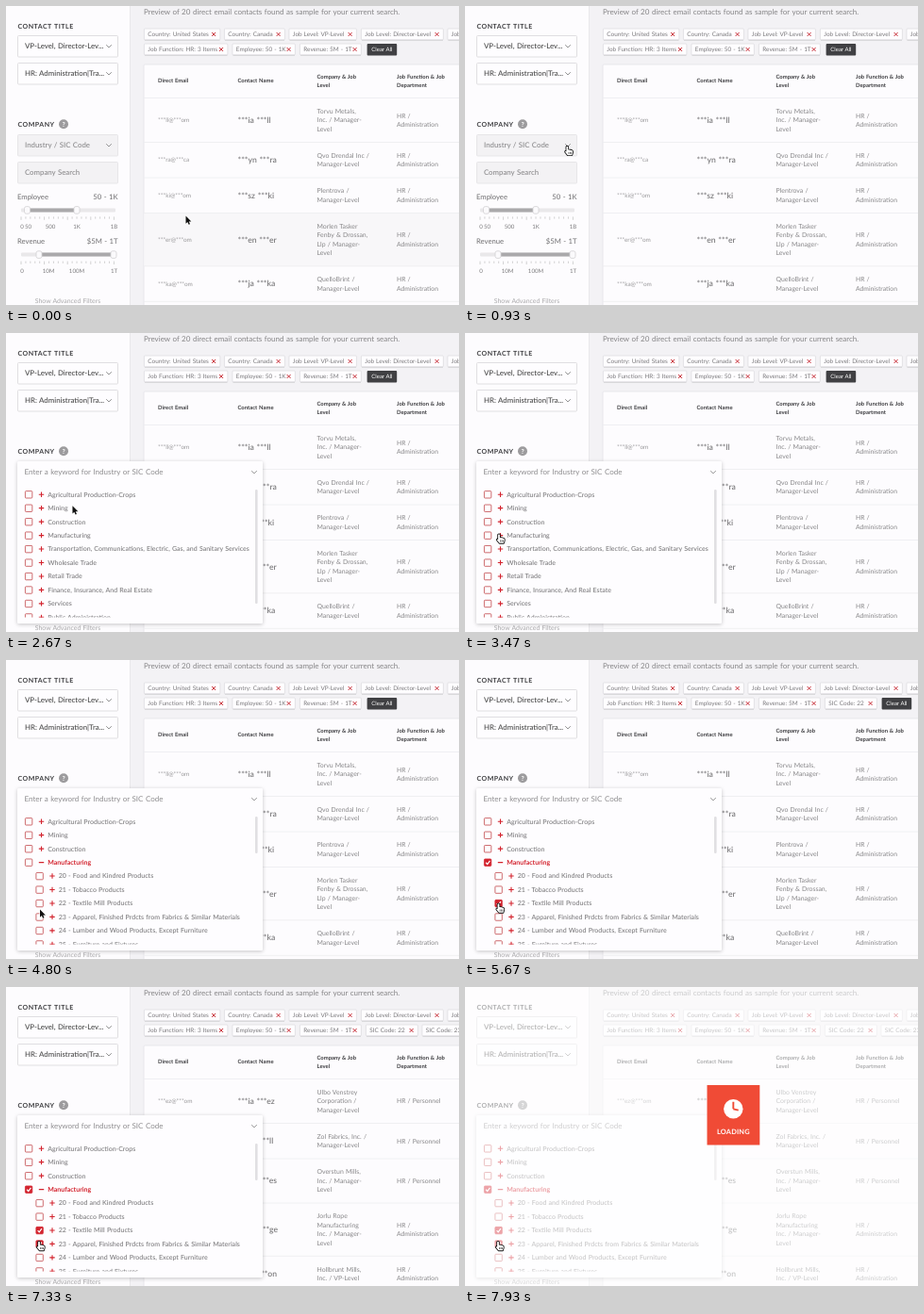
These frames come from a looping animation (480 by 317 pixels, 8000 ms). An HTML page with a canvas:

```html
<!DOCTYPE html>
<html lang="en">
<head>
<meta charset="utf-8">
<title>Contact search filters</title>
<style>
html, body { margin: 0; width: 100%; height: 100%; overflow: hidden; background: #fff; }
canvas { display: block; width: 480px; height: 317px; }
</style>
</head>
<body>
<canvas id="stage"></canvas>
<script>
const W = 480, H = 317, LOOP = 8000;
const canvas = document.getElementById('stage');
const ctx = canvas.getContext('2d');
const ratio = Math.max(1, window.devicePixelRatio || 1);
canvas.width = W * ratio;
canvas.height = H * ratio;

const RED = '#d3242f', DARK = '#3c3c3f', GREY = '#878688';

// Moments of the story, in ms
const OPEN = 2070, EXPAND = 3800, CHECK_A = 5430, CHIP_A = 5530,
      SWAP = 6250, CHECK_B = 7200, CHIP_B = 7300;
const LOADS = [[5760, 6760], [7420, 9000]];
const FADE = 180;

const clamp = v => Math.max(0, Math.min(1, v));
const ease = v => v * v * (3 - 2 * v);

function text(s, x, cy, size, color = GREY, weight = 400, align = 'left', spacing = 0) {
  ctx.font = `${weight} ${size}px Lato, "Open Sans", sans-serif`;
  ctx.textRendering = 'geometricPrecision';
  ctx.letterSpacing = spacing + 'px';
  ctx.wordSpacing = size * 0.06 + 'px';
  ctx.textAlign = align;
  ctx.fillStyle = color;
  ctx.fillText(s, x, cy + size * 0.34);
}

function box(x, y, w, h, fill, stroke, r = 1) {
  ctx.beginPath();
  ctx.roundRect(x, y, w, h, r);
  if (fill) { ctx.fillStyle = fill; ctx.fill(); }
  if (stroke) { ctx.strokeStyle = stroke; ctx.lineWidth = 0.8; ctx.stroke(); }
}

function line(points, color, width) {
  ctx.beginPath();
  points.forEach(([x, y]) => ctx.lineTo(x, y));
  ctx.strokeStyle = color;
  ctx.lineWidth = width;
  ctx.stroke();
}

const chevron = (x, y) => line([[x - 2.8, y - 1.4], [x, y + 1.4], [x + 2.8, y - 1.4]], '#8a898b', 0.9);

function lines(list, x, cy, size, color, weight) {
  list.forEach((s, i) => text(s, x, cy + (i - (list.length - 1) / 2) * 9.4, size, color, weight));
}

/* ---------- sidebar ---------- */

function slider(y, from, to, marks) {
  box(16, y - 2, 100, 4, '#e9e8ea');
  box(from, y - 2, to - from, 4, '#aaa9ab', null, 0);
  for (const x of [from, to]) box(x - 3, y - 3.8, 6, 7.6, '#fbfafc', '#d2d1d4', 2);
  for (let i = 0; i <= 20; i++) {
    const x = 16 + i * 4.92;
    line([[x, y + 7], [x, y + (i % 5 ? 9.2 : 10.4)]], '#b4b4b4', 0.6);
  }
  for (const [s, x] of marks) text(s, x, y + 17.5, 6.1, '#7c7b7d', 400, 'center');
}

function field(y, label, muted, arrow) {
  box(12.5, y + 0.5, 106, 22.5, muted ? '#f3f2f4' : '#fefdff', muted ? '#e2e1e4' : '#d8d7da');
  text(label, 20, y + 11.6, 7.8, muted ? '#929193' : '#555', 600);
  if (arrow) chevron(109, y + 11.6);
}

function sidebar() {
  box(0, 0, 131, H, '#fdfcfe', null, 0);
  line([[131.5, 0], [131.5, H]], '#e9e8eb', 1);
  text('CONTACT TITLE', 12.5, 22, 7, DARK, 700, 'left', 0.5);
  field(31, 'VP-Level, Director-Lev...', false, true);
  field(60, 'HR: Administration|Tra...', false, true);
  text('COMPANY', 12.5, 125.5, 7, DARK, 700, 'left', 0.5);
  ctx.beginPath();
  ctx.arc(61, 125.2, 5, 0, 7);
  ctx.fillStyle = '#9c9b9d';
  ctx.fill();
  text('?', 61, 125.4, 7, '#fff', 700, 'center');
  field(136, 'Industry / SIC Code', true, true);
  field(165, 'Company Search', true, false);
  text('Employee', 12, 202, 7.7, '#6f6e70');
  text('50 - 1K', 118.5, 202, 7.7, '#6f6e70', 400, 'right');
  slider(216.4, 22.5, 75, [['0', 17], ['50', 23.5], ['500', 47], ['1K', 75], ['1B', 114.5]]);
  text('Revenue', 12, 249, 7.7, '#6f6e70');
  text('$5M - 1T', 118.5, 249, 7.7, '#6f6e70', 400, 'right');
  slider(263.6, 35, 114, [['0', 17], ['10M', 45], ['100M', 75], ['1T', 114.5]]);
  text('Show Advanced Filters', 65.5, 312.3, 6.9, '#a9a8aa', 400, 'center');
}

/* ---------- chips and table ---------- */

function chip(label, x, w, cy) {
  box(x + 0.4, cy - 6, w, 12, '#fefdff', '#dddce0');
  line([[x + 1, cy + 6.2], [x + w, cy + 6.2]], '#cfced2', 0.9);
  text(label, x + 4.3, cy, 6.4, '#7a797b');
  const cx = x + w - 6.4;
  line([[cx - 2, cy - 2], [cx + 2, cy + 2]], '#c4242e', 0.95);
  line([[cx + 2, cy - 2], [cx - 2, cy + 2]], '#c4242e', 0.95);
}

function chips(t) {
  chip('Country: United States', 146, 80.5, 30);
  chip('Country: Canada', 231, 64, 30);
  chip('Job Level: VP-Level', 299.5, 71.5, 30);
  chip('Job Level: Director-Level', 376, 87, 30);
  chip('Job Level: Manager-Level', 467.5, 86, 30);
  chip('Job Function: HR: 3 Items', 146, 88.5, 46);
  chip('Employee: 50 - 1K', 239.5, 66.5, 46);
  chip('Revenue: 5M - 1T', 311, 65, 46);
  let x = 382.6;
  if (t >= CHIP_A) { chip('SIC Code: 22', 381, 55, 46); x = 441.6; }
  if (t >= CHIP_B) { chip('SIC Code: 23', 440.5, 55, 46); x = 500; }
  box(x, 40, 31.6, 12.6, '#404043');
  text('Clear All', x + 15.8, 46.3, 6, '#fff', 400, 'center');
}

const ADMIN = ['HR /', 'Administration'], STAFF = ['HR / Personnel'];
// height, email, name, company lines, department lines
const BEFORE = [
  [47, '***ll@***om', '***ia ***ll', ['Torvu Metals,', 'Inc. / Manager-', 'Level'], ADMIN],
  [37.5, '***ra@***ca', '***yn ***ra', ['Qvo Drendal Inc /', 'Manager-Level'], ADMIN],
  [37.5, '***ki@***om', '***sz ***ki', ['Plentrova /', 'Manager-Level'], ADMIN],
  [56.3, '***er@***om', '***en ***er', ['Morlen Tasker', 'Fenby & Drossan,', 'Llp / Manager-', 'Level'], ADMIN],
  [37.5, '***ka@***om', '***ja ***ka', ['QuelloBrint /', 'Manager-Level'], ADMIN]
];
const AFTER = [
  [47, '***ez@***om', '***ia ***ez', ['Ulbo Venstrey', 'Corporation /', 'Manager-Level'], STAFF],
  [37.5, '***ll@***om', '***an ***ll', ['Zol Fabrics, Inc. /', 'Manager-Level'], STAFF],
  [47, '***es@***om', '***da ***es', ['Overstun Mills,', 'Inc. / Manager-', 'Level'], STAFF],
  [56.3, '***ge@***om', '***en ***ge', ['Jorlu Rope', 'Manufacturing', 'Inc. / Manager-', 'Level'], ADMIN],
  [37.5, '***on@***om', '***ra ***on', ['Hollbrunt Mills,', 'Inc. / VP-Level'], ADMIN]
];

function table(t, cursor) {
  box(146, 62, 400, 300, '#fdfcfe', '#e4e3e7');
  text('Direct Email', 161, 79.3, 5.9, DARK, 700);
  text('Contact Name', 245.5, 79.3, 5.9, DARK, 700);
  lines(['Company & Job', 'Level'], 329.5, 79.6, 5.9, DARK, 700);
  lines(['Job Function & Job', 'Department'], 414, 79.6, 5.9, DARK, 700);
  let y = 97.5;
  for (const [h, email, name, company, dept] of t < SWAP ? BEFORE : AFTER) {
    const hover = cursor.x > 146 && cursor.y >= y && cursor.y < y + h;
    if (hover) box(146.5, y, 340, h, '#f8f7f9', null, 0);
    line([[146, y], [W, y]], '#edecef', 0.8);
    const cy = y + h / 2;
    text(email, 161, cy, 6.4, '#9a999b');
    text(name, 245.5, cy, 8.6, '#7c7b7d', 600);
    lines(company, 329.5, cy, 6.9, GREY);
    lines(dept, 414, cy, 6.8, GREY);
    y += h;
  }
  line([[146, y], [W, y]], '#edecef', 0.8);
}

/* ---------- industry list ---------- */

const GROUPS = ['Agricultural Production-Crops', 'Mining', 'Construction', 'Manufacturing',
  'Transportation, Communications, Electric, Gas, and Sanitary Services',
  'Wholesale Trade', 'Retail Trade', 'Finance, Insurance, And Real Estate', 'Services',
  'Public Administration'];
const MILLS = ['20 - Food and Kindred Products', '21 - Tobacco Products', '22 - Textile Mill Products',
  '23 - Apparel, Finished Prdcts from Fabrics & Similar Materials',
  '24 - Lumber and Wood Products, Except Furniture', '25 - Furniture and Fixtures'];

function item(label, x, y, checked, open) {
  box(x + 0.4, y - 3.6, 7.4, 7.4, checked ? RED : '#fefdff', checked ? RED : '#c2474b', 0.8);
  if (checked) line([[x + 2.1, y + 0.2], [x + 3.7, y + 1.9], [x + 6.4, y - 1.8]], '#fff', 1.2);
  const px = x + 17.5;
  line([[px - 2.7, y], [px + 2.7, y]], RED, 1.1);
  if (!open) line([[px, y - 2.7], [px, y + 2.7]], RED, 1.1);
  text(label, x + 24.2, y, 7, open ? RED : '#858486', open ? 700 : 600);
}

function dropdown(t) {
  const open = t >= EXPAND;
  ctx.save();
  ctx.shadowColor = 'rgba(0,0,0,.22)';
  ctx.shadowBlur = 4 * ratio;
  ctx.shadowOffsetY = ratio;
  box(12, 136, 260, 172, '#fefdff');
  ctx.restore();
  text('Enter a keyword for Industry or SIC Code', 19.5, 147.6, 8, '#8e8d8f');
  chevron(263, 147.5);
  box(264, 166, 2.6, open ? 39 : 121, '#e0dfe2', null, 1.3);

  ctx.save();
  ctx.beginPath();
  ctx.rect(12, 162, 252, 139.5);
  ctx.clip();
  const shown = open ? GROUPS.slice(0, 4) : GROUPS;
  const rowY = i => 171.2 + i * 14.46;
  shown.forEach((s, i) => item(s, 20, rowY(i), i === 3 && t >= CHECK_A, i === 3 && open));
  if (open) MILLS.forEach((s, i) => {
    const on = (i === 2 && t >= CHECK_A) || (i === 3 && t >= CHECK_B);
    item(s, 31.5, rowY(i + 4), on, false);
  });
  ctx.restore();
}

/* ---------- loading ---------- */

function hand(angle, length, width) {
  const a = angle * Math.PI * 2;
  line([[284.3, 129.3], [284.3 + Math.sin(a) * length, 129.3 - Math.cos(a) * length]], '#f04b36', width);
}

function loading(t) {
  let a = 0;
  for (const [from, to] of LOADS) a = Math.max(a, clamp((t - from) / FADE) * clamp((to + FADE - t) / FADE));
  if (!a) return;
  ctx.globalAlpha = a;
  box(0, 0, W, H, 'rgba(255,255,255,.58)', null, 0);
  box(256.5, 104, 55.8, 63.5, '#f04b36', null, 0);
  ctx.beginPath();
  ctx.arc(284.3, 129.3, 10.2, 0, 7);
  ctx.fillStyle = '#fff';
  ctx.fill();
  const turn = (t - 7930) / 1008;
  hand(turn, 7.6, 1.9);
  hand(0.29 + turn / 12, 5.6, 1.9);
  text('LOADING', 284.4, 153.2, 7.4, '#fff', 700, 'center', 0.2);
  ctx.globalAlpha = 1;
}

/* ---------- pointer ---------- */

// time, x, y
const PATH = [
  [0, 190.5, 222.5], [70, 190.5, 222.5], [820, 108, 149], [1270, 110, 148], [1470, 110, 148],
  [1600, 110.8, 147.8], [2250, 110.8, 147.8], [3050, 36, 213.5], [4150, 36, 213.5],
  [4700, 36, 264.5], [4950, 36, 264.5], [5300, 35.5, 258.5], [5950, 35.5, 258.5],
  [6450, 34, 266], [6850, 34, 266], [7100, 35, 270], [8000, 35, 270]
];
// spans in which the pointing hand shows
const HANDS = [[740, 2330], [2950, 4250], [5200, 5850], [7000, 8000]];

function cursorAt(t) {
  let i = 1;
  while (i < PATH.length - 1 && t > PATH[i][0]) i++;
  const [t0, x0, y0] = PATH[i - 1], [t1, x1, y1] = PATH[i];
  const k = ease(clamp((t - t0) / (t1 - t0)));
  return { x: x0 + (x1 - x0) * k, y: y0 + (y1 - y0) * k, hand: HANDS.some(([a, b]) => t >= a && t < b) };
}

const ARROW = new Path2D('M0 0V8.2L1.9 6.5L3.1 9.3L4.5 8.7L3.3 6H5.9Z');
const POINT = new Path2D('M-.9 .4Q0-.7 .9 .4V3.4L3.4 3.8L5.3 4.5Q6 5 5.8 6.4L5 9.3H.5L-2.2 5.9Q-2.4 4.7-.9 5.5Z');

function pointer({ x, y, hand }) {
  ctx.save();
  ctx.translate(x, y);
  ctx.lineJoin = 'round';
  ctx.lineWidth = hand ? 1.7 : 1.3;
  ctx.strokeStyle = hand ? '#111' : '#fff';
  ctx.fillStyle = hand ? '#fff' : '#111';
  const shape = hand ? POINT : ARROW;
  ctx.stroke(shape);
  ctx.fill(shape);
  if (hand) for (const fx of [1.6, 3.1, 4.4]) line([[fx, 6], [fx, 8]], '#111', 0.6);
  ctx.restore();
}

function draw(t) {
  const cursor = cursorAt(t);
  ctx.setTransform(ratio, 0, 0, ratio, 0, 0);
  box(0, 0, W, H, '#f3f2f5', null, 0);
  text('Preview of 20 direct email contacts found as sample for your current search.', 146, 6, 8, '#868587');
  chips(t);
  table(t, cursor);
  sidebar();
  if (t >= OPEN) dropdown(t);
  loading(t);
  pointer(cursor);
}

function frame() {
  draw(performance.now() % LOOP);
  requestAnimationFrame(frame);
}
frame();
</script>
</body>
</html>
```
